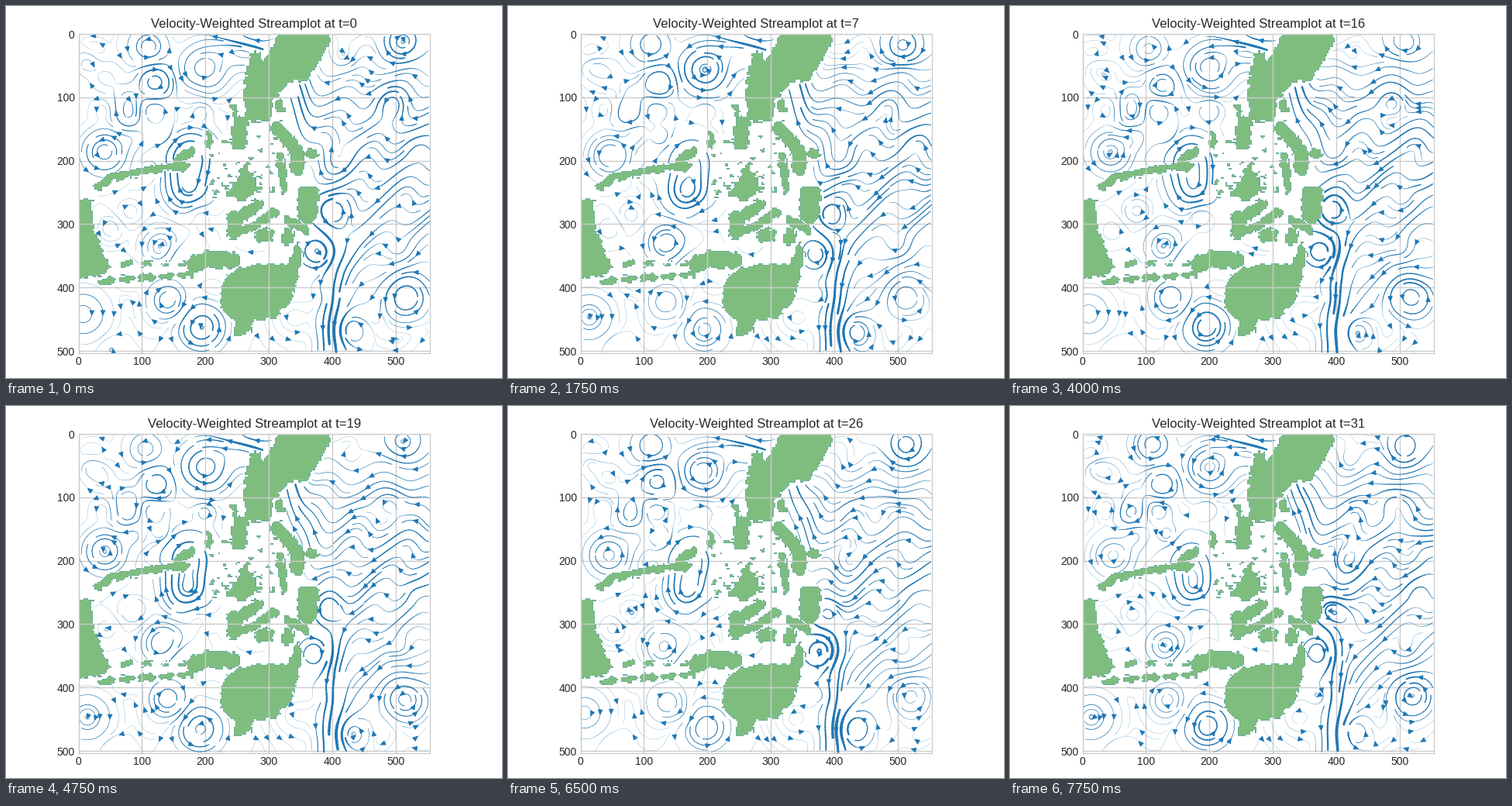
A matplotlib script for the animation above (8 s loop, 640 by 480 pixels).

```python
import numpy as np
import matplotlib.pyplot as plt
from matplotlib.animation import FuncAnimation
from matplotlib.collections import LineCollection, PolyCollection
from matplotlib.path import Path

plt.rcParams["font.family"] = "Liberation Sans"
BLUE = "#1f77b4"
FRAMES, INTERVAL = 32, 250
X0, Y0, W, H = 94, 36, 453, 411      # plot area in stage pixels
XMAX, YMAX = 554, 503                # plot area in data units
CELLS = 58                           # spacing grid of the streamlines
STEP, STEPS, MIN_LEN = 2.5, 110, 40
TAU = 2 * np.pi

xs, ys = X0 + np.arange(W), Y0 + np.arange(H)
X, Y = np.meshgrid(xs, ys)
rng = np.random.default_rng(4)


# ---------------------------------------------------------------- land
def grow(mask, times):
    for _ in range(times):
        p = np.pad(mask, 1, mode="edge")
        mask = p[1:-1, 1:-1] | p[:-2, 1:-1] | p[2:, 1:-1] | p[1:-1, :-2] | p[1:-1, 2:]
    return mask


def shrink(mask, times):
    return ~grow(~mask, times)


def fine(mask):
    return np.kron(mask, np.ones((2, 2), bool))[:H, :W]


# two-pixel cells, shifted in random blocks to make the coasts ragged
gx, gy = np.meshgrid(np.arange(X0 + 1, X0 + W + 2, 2), np.arange(Y0 + 1, Y0 + H + 2, 2))
blocks = rng.uniform(-2.2, 2.2, (2, gx.shape[0] // 3 + 1, gx.shape[1] // 3 + 1))
shift = np.kron(blocks, np.ones((1, 3, 3)))[:, :gx.shape[0], :gx.shape[1]]
spots = gx + shift[0] + 1j * (gy + shift[1])
coarse = np.zeros(gx.shape, bool)


def land(*points):
    outline = Path(np.reshape(points, (-1, 2)))
    flat = np.column_stack([spots.real.ravel(), spots.imag.ravel()])
    coarse[outline.contains_points(flat).reshape(gx.shape)] = True


def brush(radius, *points):
    knots = np.array(points[::2]) + 1j * np.array(points[1::2])
    for a, b in zip(knots, knots[1:]):
        along = np.clip(((spots - a) / (b - a)).real, 0, 1)
        coarse[abs(spots - a - along * (b - a)) < radius] = True


# large islands and the mainland corner
land(352, 30, 417, 30, 415, 54, 388, 97, 362, 99, 345, 122, 340, 150, 311, 150,
     306, 110, 314, 64, 327, 59, 331, 72, 338, 60)
land(284, 350, 303, 336, 360, 332, 376, 304, 382, 320, 374, 354, 364, 385, 345, 404,
     320, 404, 316, 421, 296, 425, 295, 408, 277, 390, 278, 364)
land(308, 205, 328, 237, 306, 252, 284, 246)
land(90, 250, 112, 250, 112, 285, 135, 338, 124, 348, 90, 353)
# smaller islands and chains
brush(10, 303, 152, 301, 177)
brush(4, 294, 131, 297, 145)
brush(5, 352, 127, 354, 134)
brush(9, 348, 158, 360, 170, 374, 190, 376, 212)
brush(7, 391, 191, 395, 191)
brush(5, 353, 195, 358, 238)
brush(7, 324, 257, 306, 271)
brush(10, 294, 274, 294, 291)
brush(6, 307, 290, 345, 267)
brush(8, 327, 297, 336, 295)
brush(13, 390, 245, 387, 268)
brush(6, 364, 277, 386, 290)
brush(7, 363, 293, 361, 302)
brush(11, 242, 333, 262, 326, 291, 328)
brush(5, 118, 235, 140, 221, 205, 209, 231, 208)
brush(6, 222, 199, 238, 190)
brush(4, 263, 167, 260, 181)
# southern arc of islets and scattered specks
for n in range(5):
    x, y = 124 + 25 * n, 355 - 2 * n
    brush(4, x, y, x + 14, y - 1)
    brush(3, x + 28, 334, x + 36, 332)
for x, y in rng.uniform((262, 165), (350, 245), (40, 2)):
    brush(rng.uniform(1.2, 3), x, y, x + 2, y)

ground = fine(coarse)
shore = ground & grow(~ground, 1)
# no streamlines on land, close to it, or in narrow waters
blocked = grow(ground, 2) | fine(shrink(grow(coarse, 9), 9))
blocked[[0, -1]] = True
blocked[:, [0, -1]] = True

# ---------------------------------------------------------------- flow
# main eddies: x, y, radius, strength (positive turns clockwise)
MAIN = [(510, 50, 16, 20), (494, 125, 15, -13), (432, 200, 14, 13), (414, 264, 15, -27),
        (404, 318, 15, 22), (515, 373, 18, -20), (443, 418, 15, -18),
        (254, 82, 19, -26), (195, 100, 14, 17), (182, 52, 15, -14),
        (236, 198, 20, 28), (234, 236, 18, 26), (130, 190, 17, -16),
        (203, 308, 16, -15), (206, 378, 15, 13), (253, 414, 17, -22), (102, 398, 18, 14)]
SMALL = 46
small = rng.uniform((100, 42, 9, -6), (540, 440, 15, 6), (SMALL, 4))
EDDIES = np.vstack([MAIN, small])
PHASE = rng.uniform(0, TAU, (3, len(EDDIES)))
PERIOD = rng.uniform(11, 25, len(EDDIES))


def sigmoid(v):
    return 1 / (1 + np.exp(-v))


def bump(v, centre, width):
    return np.exp(-((v - centre) / width) ** 2)


EAST = sigmoid((X - np.clip(352 + 0.2 * Y, 372, 422)) / 9)
TILTED = Y + 0.55 * (X - 547) * sigmoid((Y - 235) / 30)
STRAIT = (-21 * np.tanh((Y - 46 - 0.25 * (X - 300)) / 12)
          * bump(X, 315, 38) * bump(Y, 48, 28))
RIPPLE = np.sin(TAU * (X - 138) / 74) * bump(Y, 133, 16) * bump(X, 172, 50)


def velocity(t):
    cx, cy, r, amp = EDDIES.T
    turn = TAU * t / PERIOD
    cx = cx + 3 * np.sin(turn + PHASE[0])
    cy = cy + 3 * np.sin(turn + PHASE[1])
    amp = amp * (1 + 0.28 * np.sin(turn + PHASE[2]))
    ex = np.exp(-0.5 * ((xs[:, None] - cx) / r) ** 2)
    ey = np.exp(-0.5 * ((ys[:, None] - cy) / r) ** 2)
    meander = 8 * np.sin(TAU * (X + 0.5 * Y) / 68 + 0.15 * t)
    drift = -65 * np.tanh((TILTED + meander - 195) / 110) * EAST
    surge = 7 + 28 * bump(t, 12, 2)
    psi = (ey * amp) @ ex.T + drift + STRAIT + surge * RIPPLE
    dy, dx = np.gradient(psi)
    return dy - 1j * dx


def look(field, z):
    x = np.clip((z.real - X0).astype(int), 0, W - 1)
    y = np.clip((z.imag - Y0).astype(int), 0, H - 1)
    return field[y, x]


def cell_of(z):
    x = np.clip(((z.real - X0) * CELLS / W).astype(int), 0, CELLS - 1)
    y = np.clip(((z.imag - Y0) * CELLS / H).astype(int), 0, CELLS - 1)
    return y * CELLS + x


# start points run round the border first, then inwards
j, i = np.divmod(np.arange(CELLS ** 2), CELLS)
depth = np.minimum.reduce([i, j, CELLS - 1 - i, CELLS - 1 - j])
order = np.lexsort((np.arctan2(j - CELLS / 2, i - CELLS / 2), depth))
starts = (X0 + (i + 0.5) * W / CELLS + 1j * (Y0 + (j + 0.5) * H / CELLS))[order]
starts = starts[~look(blocked, starts)]


def trace(vel):
    """Follow the flow both ways from every start point."""
    unit = np.where(blocked, 0, vel / (np.abs(vel) + 1e-9))
    z = np.concatenate([starts, starts])
    step = np.repeat([STEP, -STEP], len(starts))
    path = [z]
    for _ in range(STEPS):
        z = z + step * look(unit, z + 0.5 * step * look(unit, z))
        path.append(z)
    return np.array(path)


def streamlines(vel):
    """Keep the paths that are long enough, one to a cell."""
    n = len(starts)
    path = trace(vel)
    cells = cell_of(path)
    alive = 1 + np.count_nonzero(np.diff(path, axis=0), axis=0)
    used = np.zeros(CELLS ** 2, bool)
    lines = []
    for s in range(n):
        if used[cells[0, s]]:
            continue
        seen, halves = {cells[0, s]}, []
        for col in (s, s + n):
            track = cells[:alive[col], col]
            end = len(track)
            for k in np.flatnonzero(np.diff(track)) + 1:
                if used[track[k]] or track[k] in seen:
                    end = k
                    break
                seen.add(track[k])
            halves.append(path[:end, col])
        line = np.concatenate([halves[1][:0:-1], halves[0]])
        if len(line) * STEP >= MIN_LEN:
            used[list(seen)] = True
            lines.append(line)
    return lines


def to_data(z):
    return np.stack([(z.real - X0) * XMAX / W, (z.imag - Y0) * YMAX / H], -1)


# ---------------------------------------------------------------- figure
fig = plt.figure(figsize=(6.4, 4.8), dpi=100, facecolor="white")
ax = fig.add_axes([93.5 / 640, 32.5 / 480, 453.5 / 640, 411.5 / 480])
picture = np.ones((H, W, 3))
picture[ground] = (0.5, 0.745, 0.5)
picture[shore] = (0.43, 0.69, 0.6)
ax.imshow(picture, extent=(0, XMAX, YMAX, 0), interpolation="nearest", aspect="auto", zorder=0)
ticks = range(0, 501, 100)
ax.set(xlim=(0, XMAX), ylim=(YMAX, 0), xticks=ticks, yticks=ticks)
ax.set_axisbelow(True)
ax.grid(color="0.8", linewidth=1)
ax.tick_params(length=0, labelsize=10, labelcolor="0.15")
for spine in ax.spines.values():
    spine.set(color="0.8", linewidth=1)
title = ax.set_title("", fontsize=12, color="0.15")
strokes = ax.add_collection(LineCollection([], colors=BLUE, capstyle="round", zorder=2),
                            autolim=False)
heads = ax.add_collection(PolyCollection([], facecolors=BLUE, edgecolors=BLUE,
                                         linewidths=0.7, zorder=2.1), autolim=False)


def draw(t):
    vel = velocity(t)
    pieces, tips = [], []
    for z in streamlines(vel):
        k = np.arange(0, len(z) - 2, 2)
        pieces.append(np.stack([z[k], z[k + 1], z[k + 2]], 1))
        m = len(z) // 2
        d = z[m + 1] - z[m]
        d /= abs(d) + 1e-9
        tips.append(z[m] + d * np.array([2, -4 + 2.7j, -4 - 2.7j]))
    pieces = np.concatenate(pieces)
    speed = np.abs(look(vel, pieces[:, 1]))
    top = np.abs(vel[~blocked]).max()
    strokes.set_segments(to_data(pieces))
    strokes.set_linewidths(np.maximum(2.8 * speed / top, 0.15))
    heads.set_verts(to_data(np.array(tips)))
    title.set_text(f"Velocity-Weighted Streamplot at t={t}")
    return strokes, heads, title


anim = FuncAnimation(fig, draw, frames=FRAMES, interval=INTERVAL, repeat=True, repeat_delay=0)
plt.show()
```
